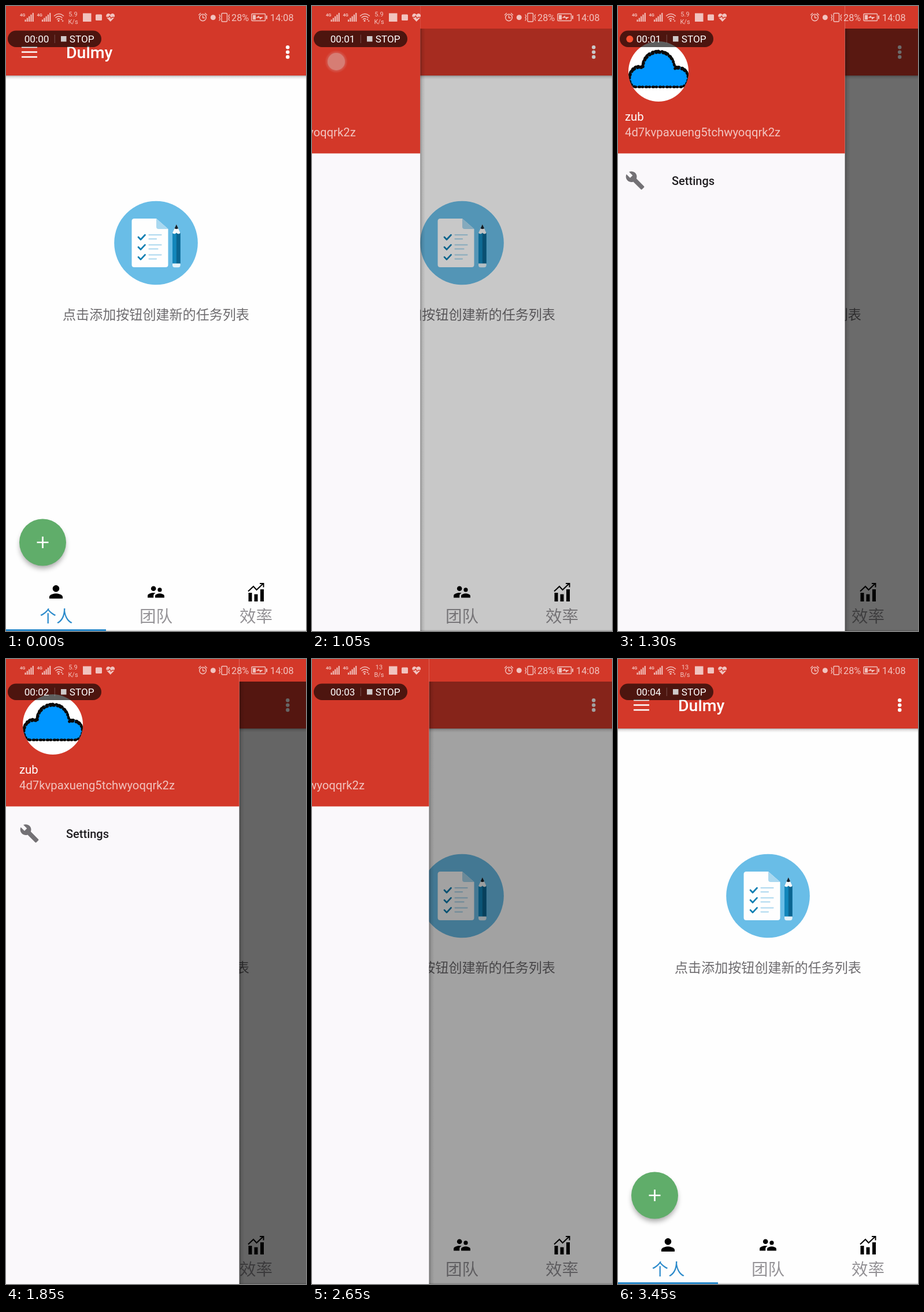
Recreate the animation shown at these times as an HTML page. Size 519 px wide and 1079 px high, loop 3.5 s.

```html
<!DOCTYPE html>
<html lang="zh">
<head>
<meta charset="utf-8">
<title>Navigation drawer</title>
<style>
  html, body { margin: 0; width: 100%; height: 100%; overflow: hidden; background: #fefefe; }
  svg { display: block; width: 100vw; height: 100vh; }
  text { font-family: Roboto, sans-serif; }
  .cjk { font-family: "Noto Sans CJK SC", "Noto Sans CJK", sans-serif; }
  .mid { text-anchor: middle; }
  .line { fill: none; stroke-linecap: round; stroke-linejoin: round; }
</style>
</head>
<body>
<svg viewBox="0 0 519 1079" preserveAspectRatio="none">
  <defs>
    <linearGradient id="down" x2="0" y2="1">
      <stop stop-opacity=".3"/><stop offset=".4" stop-opacity=".1"/><stop offset="1" stop-opacity="0"/>
    </linearGradient>
    <linearGradient id="side">
      <stop stop-opacity=".3"/><stop offset=".4" stop-opacity=".1"/><stop offset="1" stop-opacity="0"/>
    </linearGradient>
    <radialGradient id="glow">
      <stop offset=".7" stop-color="#dcdce4" stop-opacity=".55"/>
      <stop offset="1" stop-color="#dcdce4" stop-opacity="0"/>
    </radialGradient>
    <filter id="blur" x="-30%" y="-30%" width="160%" height="160%"><feGaussianBlur stdDeviation="5"/></filter>
    <clipPath id="face"><circle cx="81" cy="113" r="52"/></clipPath>
  </defs>

  <rect width="519" height="1079" fill="#fefefe"/>

  <!-- toolbar -->
  <rect width="519" height="120" fill="#d33829"/>
  <rect y="120" width="519" height="7" fill="url(#down)"/>
  <g id="burger" stroke="#fff" stroke-width="2.7"><path d="M-13.5-8.5h27M-13.5 0h27M-13.5 8.5h27"/></g>
  <text x="104" y="90" font-size="28.5" font-weight="500" fill="#fff">Dulmy</text>
  <g fill="#fff"><circle cx="487.3" cy="71.2" r="3.2"/><circle cx="487.3" cy="79.6" r="3.2"/><circle cx="487.3" cy="88" r="3.2"/></g>

  <!-- empty state -->
  <circle cx="259.5" cy="409" r="72.3" fill="#69bde7"/>
  <path d="M222 367H260L280.5 385V446.500Q280.500 451 276 451H222Q217.500 451 217.500 446.500V371.500Q217.500 367 222 367Z" fill="#fefefe"/>
  <path d="M260 367V381Q260 385 264 385H280.500Z" fill="#a9d8f0"/>
  <g id="rows"></g>
  <path d="M288 391h13.600v54h-13.600z" fill="#1286bb"/>
  <path d="M294.800 391h6.800v54h-6.800z" fill="#0b6591"/>
  <path d="M288 392L294.800 377L301.600 392Q298 395 294.800 391.500Q291.500 395 288 392Z" fill="#f4f8fa"/>
  <path d="M291.600 384L294.800 377L298 384Q294.800 386 291.600 384Z" fill="#14212b"/>
  <path d="M288 444.500h13.600v3q0 3.700-3.700 3.700h-6.200q-3.700 0-3.700-3.700z" fill="#e4f2f9"/>
  <text class="cjk mid" x="259.500" y="541" font-size="23.070" fill="#6d6b6e">点击添加按钮创建新的任务列表</text>

  <!-- add button -->
  <circle cx="63.500" cy="932" r="39" opacity=".35" filter="url(#blur)"/>
  <circle cx="63.500" cy="926" r="40.500" fill="#60ad6a"/>
  <path d="M53.500 926h20M63.500 916v20" stroke="#fff" stroke-width="2.700"/>

  <!-- tabs -->
  <g class="cjk mid" font-size="28.500">
    <text class="cjk" x="87" y="1064" fill="#2b8acb">个人</text>
    <text class="cjk" x="259.500" y="1064" fill="#949296">团队</text>
    <text class="cjk" x="432.500" y="1064" fill="#949296">效率</text>
  </g>
  <path d="M173 1077.500h346v1.500h-346z" fill="#d9d9d9"/>
  <path d="M0 1076h173v3h-173z" fill="#2b8acb"/>
  <path transform="translate(69.200 994.200) scale(1.440)" d="M12 12c2.210 0 4-1.790 4-4s-1.790-4-4-4-4 1.790-4 4 1.790 4 4 4zm0 2c-2.670 0-8 1.340-8 4v2h16v-2c0-2.660-5.330-4-8-4z"/>
  <path transform="translate(242.200 994.200) scale(1.440)" d="M16.500 12a2.500 2.500 0 1 0 0-5a2.500 2.500 0 0 0 0 5zM9 11a3 3 0 1 0 0-6a3 3 0 0 0 0 6zm7.500 3c-1.830 0-5.500.920-5.500 2.750V19h11v-2.250c0-1.830-3.670-2.750-5.500-2.750zM9 13c-2.330 0-7 1.170-7 3.500V19h7v-2.250c0-.850.330-2.340 2.370-3.470C10.500 13.100 9.660 13 9 13z"/>
  <path d="M419.500 1013h6v15h-6zM429.500 1015.500h6v12.500h-6zM440 1007h6v21h-6z"/>
  <path d="M419 1010.500L428 1002L433.500 1008L444.500 997.500M439 997h6.500v6.500" fill="none" stroke="#000" stroke-width="2"/>

  <path id="scrim" d="M0 39h519v1040H0z"/>

  <!-- drawer -->
  <g id="drawer">
    <rect x="403.500" y="39" width="9" height="1040" fill="url(#side)"/>
    <rect width="403.500" height="1079" fill="#faf8fb"/>
    <rect width="403.500" height="254.500" fill="#d33829"/>
    <circle cx="81" cy="113" r="52" fill="#fff"/>
    <g clip-path="url(#face)" class="line" stroke="#0a0a0a">
      <path id="cloud" d="M40 138.500C31 136 29 126 32 117C35 108 44 103 54 106C53 91 65 79 81 79C97 79 107 90 109 107C121 104 131 112 131.500 121C132 131 127 138 119 138.500Z" fill="#0096ff" stroke-width="4.500"/>
      <use href="#cloud" stroke-width="3" stroke-dasharray="1 4 2 3 1 6" transform="translate(0 -1.200)"/>
      <use href="#cloud" stroke-width="3" stroke-dasharray="2 5 1 4" transform="translate(.5 1.200)"/>
    </g>
    <text x="23" y="198" font-size="20.300" fill="#fff">zub</text>
    <text x="23" y="225" font-size="20.300" fill="#fff" fill-opacity=".7">4d7kvpaxueng5tchwyoqqrk2z</text>
    <path transform="translate(23.300 283.800) scale(1.440)" fill="#737175" d="M22.700 19l-9.100-9.100c.9-2.300.4-5-1.500-6.900-2-2-5-2.400-7.400-1.300L9 6 6 9 1.600 4.700C.4 7.100.9 10.100 2.900 12.100c1.900 1.900 4.600 2.400 6.900 1.500l9.100 9.100c.4.4 1 .4 1.400 0l2.300-2.300c.5-.4.5-1.100.1-1.400z"/>
    <text x="104" y="308.500" font-size="20" font-weight="500" fill="#1f1d20">Settings</text>
  </g>

  <!-- status bar -->
  <g fill="#fff" stroke="#fff" stroke-width="0" opacity=".7">
    <g id="signal"></g>
    <g class="line" stroke-width="1.500">
      <path d="M83.500 17Q91.500 10 99.500 17M86 20Q91.500 15.500 97 20M88.500 23Q91 21 93 22.500"/>
    </g>
    <circle cx="91" cy="25.500" r="1.500"/>
    <path d="M94.500 24l1.600-2.500 1.600 2.500zM96.500 25h3.200l-1.600 2.500z"/>
    <text id="rate" class="mid" x="116" y="17.500" font-size="11"></text>
    <text id="unit" class="mid" x="116" y="30.500" font-size="11"></text>
    <rect x="133" y="12.500" width="14.500" height="14.500"/>
    <rect x="155" y="14.500" width="11" height="10.500" rx="1.500"/>
    <path d="M180.700 27L174.500 20.500C171 16 176 10 180.700 15C185.500 10 190.500 16 187 20.500Z"/>
    <path class="line" d="M173 19.500h4.500l2-2.500 2 4.500 2-2h4.500" stroke="#d33829" stroke-width="1.300"/>
    <g class="line" stroke-width="1.400">
      <circle cx="340.500" cy="20" r="5.800"/>
      <path d="M340.500 16.500v4h3M333.500 15.500l3-3M347.500 15.500l-3-3"/>
      <rect x="373" y="12.500" width="9.500" height="14.500" rx="1.500"/>
      <path d="M369 15l1.500 2.500-1.500 2.500 1.500 2.500-1.500 2.500M386.500 15l-1.500 2.500 1.500 2.500-1.500 2.500 1.500 2.500"/>
      <rect x="425" y="13.500" width="23.500" height="12" rx="1"/>
    </g>
    <circle cx="358.300" cy="19.800" r="4.500"/>
    <path d="M450 16.500h2v6h-2zM427 15.500h5v8h-5zM432 20.500l6-4v2.500h7l-6 4.500v-3z"/>
    <text x="390" y="25.500" font-size="16.300">28%</text>
    <text x="457" y="25.500" font-size="16.300">14:08</text>
  </g>

  <g id="touch">
    <circle r="20" fill="url(#glow)"/>
    <circle r="15" fill="#dcdcdc"/>
  </g>

  <!-- recorder -->
  <rect x="3" y="42.500" width="162" height="28.500" rx="14.200" fill-opacity=".63"/>
  <circle id="rec" cx="20.300" cy="57" r="6" fill="#fb5030"/>
  <g font-size="17.200" fill="#fff">
    <text id="clock" x="31.700" y="63.200"></text>
    <text x="109.700" y="63.200">STOP</text>
  </g>
  <path d="M84.300 49.500v14.500" stroke="#fff" stroke-opacity=".25"/>
  <rect x="95" y="52" width="9.500" height="9.500" fill="#cfcaca"/>
</svg>
<script>
const $ = id => document.getElementById(id);
const LOOP = 3500, STEP = 50, WIDTH = 403.5, SETTLE = 512, CLOSE = 2584;

$('rows').innerHTML = [0, 1, 2].map(i => {
  const y = 399 + i * 17.2;
  return `<g class="line">
    <path d="M229 ${y}l4 4.200 7.500-8" stroke="#0d7fb2" stroke-width="2.800"/>
    <path d="M247.500 ${y - 3.8}h21M247.500 ${y + 3.2}h${i == 1 ? 15 : 12.5}" stroke="#b3dbf0" stroke-width="2.200"/>
  </g>`;
}).join('');

$('signal').innerHTML = [24, 53.5].map(x =>
  `<text x="${x}" y="18" font-size="7.500" font-weight="700">4G</text>` +
  [0, 1, 2, 3, 4].map(i => {
    const h = 3.5 + i * 2.9;
    return `<rect x="${x + 8.5 + i * 3.3}" y="${27 - h}" width="2.100" height="${h}"/>`;
  }).join('')).join('');

// piecewise linear interpolation over [time, value] points
function lerp(points, t) {
  const i = points.findIndex(p => p[0] > t);
  if (i < 0) return points[points.length - 1][1];
  if (i == 0) return points[0][1];
  const [t0, a] = points[i - 1], [t1, b] = points[i];
  return a + (b - a) * (t - t0) / (t1 - t0);
}

const settle = ms => 1 - (1 - Math.min(1, Math.max(0, ms / SETTLE))) ** 5;
const opening = [[930, 0], [950, 10], [1050, 60], [1300, 263], [1550, SETTLE + 20]];
const taps = [
  { x: 42, y: 96, alpha: [[800, 0], [900, .7], [950, .53], [1050, .42], [1150, 0]] },
  { x: 493, y: 288, alpha: [[2400, 0], [2450, .82], [2570, .82], [2650, 0]] }
];

const openness = (t, lag = 0) => t < CLOSE
  ? settle(lerp(opening, t) - lag)
  : 1 - settle(t - CLOSE - lag);

function draw(t) {
  const open = openness(t);
  $('drawer').setAttribute('transform', `translate(${(open - 1) * WIDTH - (open ? 0 : 12)})`);
  $('burger').setAttribute('transform', `translate(40.500 79.500) rotate(${-180 * open})`);
  $('scrim').setAttribute('opacity', .6 * openness(t, 17));

  const tap = taps[t < 1800 ? 0 : 1];
  $('touch').setAttribute('transform', `translate(${tap.x} ${tap.y})`);
  $('touch').setAttribute('opacity', lerp(tap.alpha, t));

  const blink = t % 1000;
  $('rec').setAttribute('opacity', blink >= 100 && blink < 400 ? 1 : 0);
  $('clock').textContent = '00:0' + Math.floor((t + 600) / 1000);
  const early = t < 1900;
  $('rate').textContent = early ? '5.9' : '13';
  $('unit').textContent = early ? 'K/s' : 'B/s';
}

const start = performance.now();
function tick() {
  const t = (performance.now() - start) % LOOP;
  draw(Math.floor(t / STEP) * STEP);
  requestAnimationFrame(tick);
}
tick();
</script>
</body>
</html>
```
